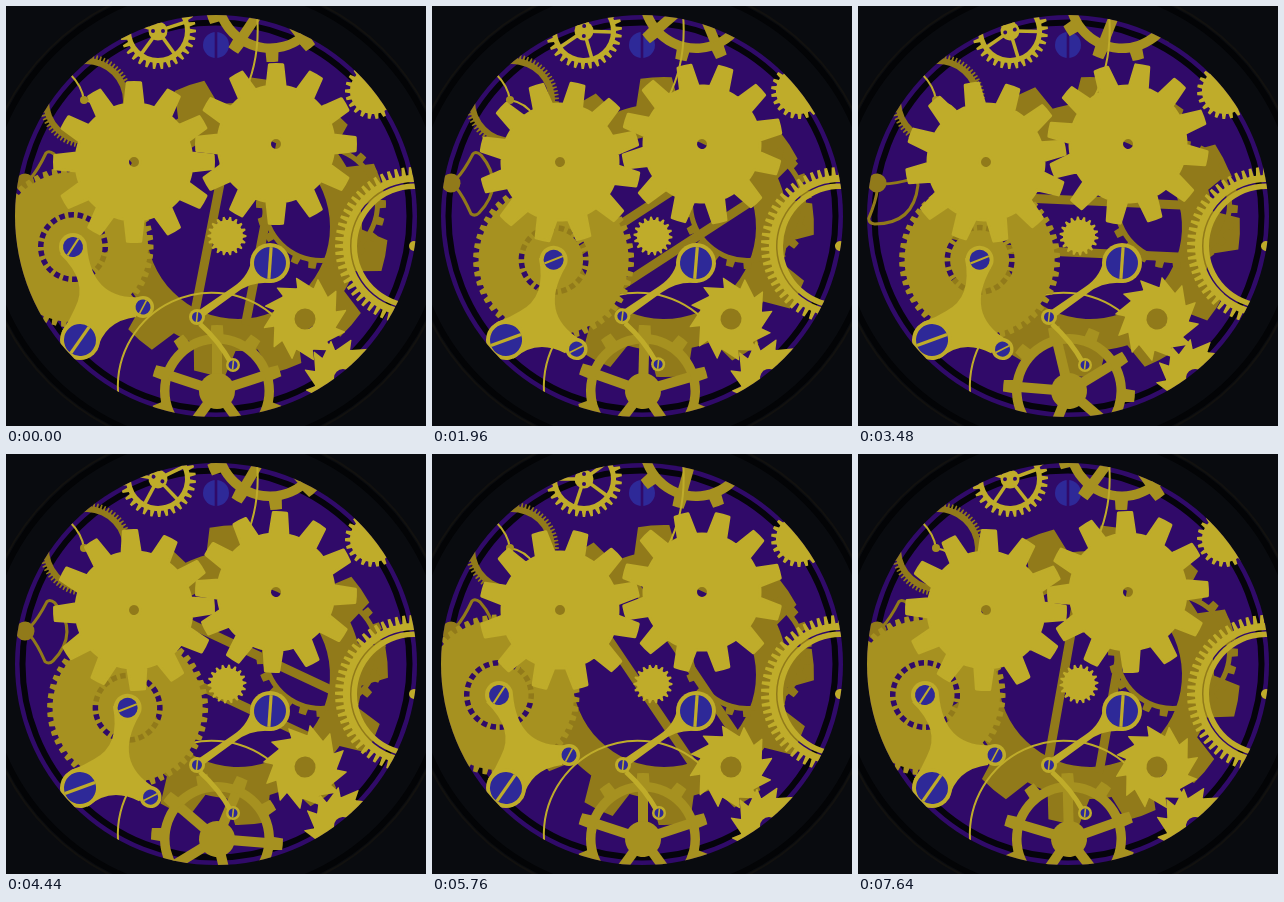
An HTML page with a canvas for the animation above (7680 ms loop, 420x420 px).

```html
<!DOCTYPE html>
<html lang="en">
<head>
<meta charset="utf-8">
<title>Clockwork</title>
<style>
html, body { margin: 0; width: 100%; height: 100%; overflow: hidden; background: #090b0f; }
canvas { display: block; }
</style>
</head>
<body>
<canvas id="stage" width="420" height="420"></canvas>
<script>
const ctx = document.getElementById('stage').getContext('2d');
const LOOP = 7680, TICK = 640, TAU = Math.PI * 2, DEG = TAU / 360;
const PURPLE = '#300a69', BLUE = '#2e2998';
const DARK = '#917a1a', MID = '#a69120', BRIGHT = '#bfac2a';

const smooth = (t, from, to) => {
  const u = Math.min(1, Math.max(0, (t - from) / (to - from)));
  return u * u * (3 - 2 * u);
};

function at(x, y, angle, draw) {
  ctx.save();
  ctx.translate(x, y);
  ctx.rotate(angle);
  draw();
  ctx.restore();
}

function disc(x, y, r, color) {
  ctx.fillStyle = color;
  ctx.beginPath();
  ctx.arc(x, y, r, 0, TAU);
  ctx.fill();
}

function stroke(path, width, color) {
  ctx.lineWidth = width;
  ctx.strokeStyle = color;
  ctx.stroke(new Path2D(path));
}

function circle(x, y, r, width, color) {
  ctx.lineWidth = width;
  ctx.strokeStyle = color;
  ctx.beginPath();
  ctx.arc(x, y, r, 0, TAU);
  ctx.stroke();
}

function addHole(path, r) {
  path.moveTo(r, 0);
  path.arc(0, 0, r, 0, TAU);
}

// Closed outline; base and tip are tooth widths as shares of one step.
function teeth(n, root, outer, base = 0.7, tip = 0.4, skew = 0) {
  const path = new Path2D(), step = TAU / n;
  for (let i = 0; i < n; i++) {
    const mid = i * step;
    const top = mid + skew * step;
    path.arc(0, 0, root, mid - step / 2, mid - base * step / 2);
    path.arc(0, 0, outer, top - tip * step / 2, top + tip * step / 2);
    path.arc(0, 0, root, mid + base * step / 2, mid + step / 2);
  }
  path.closePath();
  return path;
}

function gear(path, holes, color, round = 0) {
  holes.forEach(r => addHole(path, r));
  ctx.fillStyle = color;
  ctx.fill(path, 'evenodd');
  if (round) {
    ctx.lineWidth = round;
    ctx.strokeStyle = color;
    ctx.stroke(path);
  }
}

function spokes(n, from, to, width, color) {
  for (let i = 0; i < n; i++) {
    at(0, 0, i * TAU / n, () => stroke(`M${from} 0H${to}`, width, color));
  }
}

function screw(x, y, r, angle, slot = BRIGHT) {
  at(x, y, angle * DEG, () => {
    disc(0, 0, r, BLUE);
    stroke(`M${-r} 0H${r}`, Math.max(1.6, r * 0.2), slot);
  });
}

function caseBack() {
  ctx.fillStyle = '#090b0f';
  ctx.fillRect(0, 0, 420, 420);
  circle(210, 210, 231, 6, '#030406');
  circle(210, 210, 236, 2, '#12110f');
  disc(210, 210, 201, PURPLE);
  circle(210, 210, 193.5, 6, '#05040b');
}

function backTrain(p, t) {
  screw(210, 39, 13, 90, PURPLE);
  at(232, 221, 101 * DEG + p * TAU / 2, () => {
    gear(teeth(12, 124, 150, 0.66, 0.4), [92], DARK);
    stroke('M-95 -26H95M-95 26H95', 9, DARK);
  });
  at(315, 198, -p * TAU * 6 / 22, () => gear(teeth(22, 59, 65, 0.5, 0.4), [54], DARK));

  // Swinging sector at the left edge
  const swing = 25 * (1 - Math.cos(TAU * t / TICK)) * DEG;
  at(19, 177, swing, () => {
    stroke('M5 -4Q13 -13 21 -30Q24 -33 29 -29Q55 0 29 29Q25 33 21 30Q13 13 5 4', 3, DARK);
    disc(0, 0, 9.5, DARK);
  });

  at(80, 95, p * TAU * 9 / 76, () => gear(teeth(76, 43, 47, 0.6, 0.35), [37], DARK));
}

function spokedWheel(x, y, angle) {
  at(x, y, angle, () => {
    gear(teeth(10, 57, 66, 0.36, 0.28), [47.5], MID);
    spokes(5, 10, 50, 10, MID);
    disc(0, 0, 18, MID);
  });
}

function middleTrain(p) {
  spokedWheel(264, -10, 52 * DEG - p * TAU * 1.4);
  stroke('M251 8Q255 55 236 92', 2, BRIGHT);
  stroke('M64 68Q76 80 78 94Q94 97 102 110', 2, BRIGHT);
  disc(78, 94, 4, MID);
  stroke('M112 386A94 94 0 0 1 270 312', 2, BRIGHT);
  spokedWheel(211, 385, p * TAU * 0.8 - 90 * DEG);
}

function rocker(p, t) {
  const shift = smooth(t, 1240, 1880) - smooth(t, 5080, 5720);
  at(74, 334, shift * 35 * DEG, () => {
    at(-7, -93, -p * TAU * 10 / 52, () => {
      const body = teeth(52, 75, 80.5, 0.65, 0.45);
      const step = TAU / 22;
      for (let i = 0; i < 22; i++) {
        const a = i * step, b = a + step * 0.6;
        body.moveTo(35 * Math.cos(a), 35 * Math.sin(a));
        body.arc(0, 0, 35, a, b);
        body.arc(0, 0, 29.5, b, a, true);
        body.closePath();
      }
      gear(body, [], MID);
    });
    ctx.fillStyle = BRIGHT;
    ctx.fill(new Path2D('M-20 -86Q9 -58 -5 -32Q-10 -20 -18 -9L17 11Q24 -19 56 -23L60 -43Q12 -40 7 -93Z'));
    disc(-7, -93, 14, BRIGHT);
    disc(0, 0, 20, BRIGHT);
    disc(63, -33, 11, BRIGHT);
    screw(-7, -93, 10, -57);
    screw(0, 0, 16, -55);
    screw(63, -33, 7.5, -62);
  });
}

function frontGears(p) {
  const turn = 14 / 12 * TAU * p;
  const bigGear = () => gear(teeth(12, 58, 79.5, 0.6, 0.32), [6.5], BRIGHT, 3);
  at(128, 156, -turn, bigGear);
  at(270, 138, turn, bigGear);
  at(221, 230, p * TAU * 2, () => gear(teeth(18, 16, 19.5, 0.7, 0.25), [], BRIGHT));
  at(367, 85, -p * TAU * 14 / 22, () => gear(teeth(22, 23, 28, 0.65, 0.35), [], BRIGHT));
  at(408, 240, p * TAU * 14 / 66, () => {
    gear(teeth(66, 71, 79, 0.65, 0.38), [64, 62.5, 57], BRIGHT);
    disc(0, 0, 5, BRIGHT);
  });
  at(152, 25, p * TAU, () => {
    gear(teeth(30, 32, 38, 0.65, 0.3), [27], BRIGHT);
    at(0, 0, 54 * DEG, () => spokes(5, 5, 28, 3.5, BRIGHT));
    disc(0, 0, 9.5, BRIGHT);
    disc(-5, 0, 2, PURPLE);
    disc(5, 0, 2, PURPLE);
  });
  at(299, 313, p * TAU * 8 / 12, () => gear(teeth(12, 32, 42, 0.95, 0.04, -0.4), [10.5], BRIGHT));
  at(337, 372, -p * TAU * 8 / 12, () => gear(teeth(12, 29, 39, 0.95, 0.04, 0.4), [9], BRIGHT));
}

function crank(t) {
  const u = Math.min(1, Math.max(0, (t - 300) / 2000));
  const push = Math.sin(u * Math.PI) ** 2;
  at(264, 257, push * 2.6 * DEG, () => {
    ctx.fillStyle = BRIGHT;
    ctx.fill(new Path2D('M-18 -8Q-19 12 -37 24L-75 50L-71 57L-34 30Q-19 18 2 20Z'));
    disc(0, 0, 20, BRIGHT);
    disc(-73, 54, 8, BRIGHT);
    screw(0, 0, 16, -86);
    screw(-73, 54, 5, -84);
  });
  at(191 - 3.3 * push, 311 - 2.9 * push, 0, () => {
    stroke('M3 7Q22 24 34 46', 5, BRIGHT);
    disc(36, 48, 7, BRIGHT);
    screw(36, 48, 4.5, -84);
  });
}

function draw(t) {
  const p = t / LOOP;
  caseBack();
  ctx.save();
  ctx.beginPath();
  ctx.arc(210, 210, 201, 0, TAU);
  ctx.clip();
  backTrain(p, t);
  middleTrain(p);
  rocker(p, t);
  frontGears(p);
  crank(t);
  ctx.restore();
}

const start = performance.now();
function tick() {
  draw((performance.now() - start) % LOOP);
  requestAnimationFrame(tick);
}
ctx.lineJoin = 'round';
tick();
</script>
</body>
</html>
```
